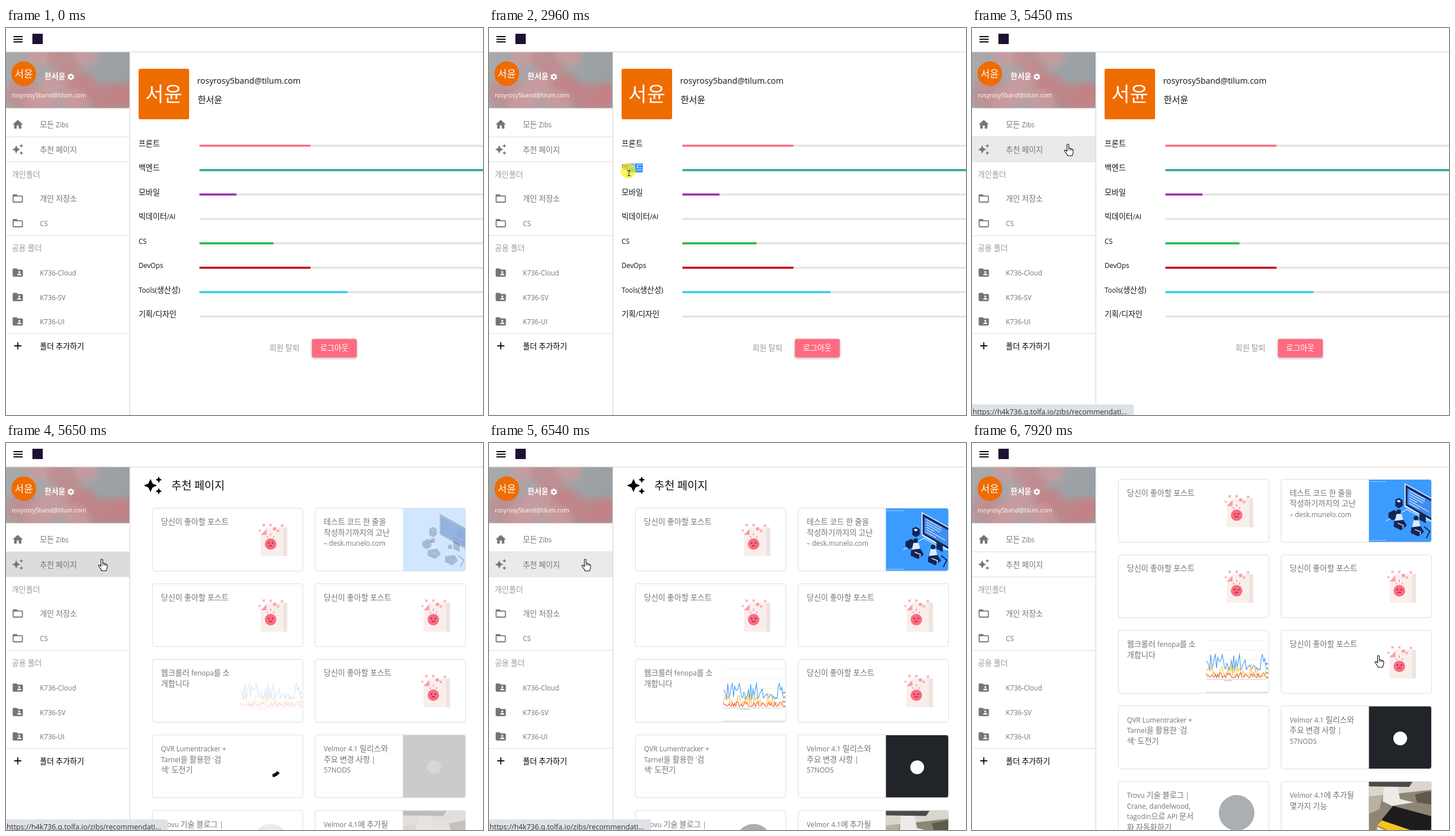
These frames come from a looping animation (831 px wide and 674 px high, 7990 ms). An HTML page with a canvas:

```html
<!DOCTYPE html>
<html lang="ko">
<head>
<meta charset="utf-8">
<title>Recommendation page</title>
<style>
html, body { margin: 0; width: 100%; height: 100%; overflow: hidden; background: #fff; }
canvas { display: block; width: 831px; height: 674px; }
</style>
</head>
<body>
<canvas id="stage" width="831" height="674"></canvas>
<script>
const c = document.getElementById('stage').getContext('2d');
const LOOP = 7990, GREY = '#757575', PINK = '#ff6b81', ORANGE = '#ef6c00';
const T = { select: 2500, release: 3300, click: 3440, hover: 4080, page: 5600, leave: 6560, scroll: 7540 };
const EMAIL = 'rosyrosy5band@tilum.com', NAME = '한서윤', SHORT = '서윤';

const clamp = v => Math.max(0, Math.min(1, v));
const ramp = (t, a, b) => clamp((t - a) / (b - a));
const easeOut = p => 1 - (1 - p) ** 3;
const smooth = p => p * p * (3 - 2 * p);
const noise = n => { const v = Math.sin(n * 127.1 + 11.7) * 43758.5453; return v - Math.floor(v); };

function rect(x, y, w, h, color, r = 0) {
  c.fillStyle = color;
  c.beginPath();
  c.roundRect(x, y, w, h, r);
  c.fill();
}
function disc(x, y, r, color) {
  c.fillStyle = color;
  c.beginPath();
  c.arc(x, y, r, 0, 7);
  c.fill();
}
function trace(points, close) {
  c.beginPath();
  for (let i = 0; i < points.length; i += 2) c.lineTo(points[i], points[i + 1]);
  if (close) c.closePath();
}
function poly(color, ...points) {
  c.fillStyle = color;
  trace(points, true);
  c.fill();
}
function line(color, width, ...points) {
  c.strokeStyle = color;
  c.lineWidth = width;
  trace(points);
  c.stroke();
}
function at(x, y, draw) {
  c.save();
  c.translate(x, y);
  draw();
  c.restore();
}

// Hangul and Latin runs use separate fonts; Latin is set a little smaller.
function text(str, x, y, size, color, weight = 400, centered = false) {
  const runs = str.match(/[가-힣]+|[^가-힣]+/g).map(s => {
    const font = /[가-힣]/.test(s)
      ? `${weight} ${size}px "Noto Sans CJK KR", "Noto Sans CJK", sans-serif`
      : `${weight} ${size * .88}px "Open Sans", sans-serif`;
    c.font = font;
    return { s, font, w: c.measureText(s).width };
  });
  if (centered) x -= runs.reduce((sum, r) => sum + r.w, 0) / 2;
  c.fillStyle = color;
  for (const r of runs) {
    c.font = r.font;
    c.fillText(r.s, x, y);
    x += r.w;
  }
}

const FOLDER = 'M20 6H12L10 4H4C2.9 4 2 4.9 2 6V18A2 2 0 0 0 4 20H20A2 2 0 0 0 22 18V8C22 6.9 21.1 6 20 6Z';
const star = (x, y, r) => {
  const k = r * .313;
  return `M${x} ${y - r}l${k} ${r - k}l${r - k} ${k}l${k - r} ${k}l${-k} ${r - k}l${-k} ${k - r}l${k - r} ${-k}l${r - k} ${-k}Z`;
};
const icons = {
  home: 'M10 20V14H14V20H19V12H22L12 3 2 12H5V20Z',
  spark: star(9, 12, 8) + star(19, 5, 4) + star(19, 19, 4),
  folder: FOLDER + 'M4 8H20V18H4Z',
  shared: FOLDER + 'M11 17V16C11 14.7 13.7 14 15 14S19 14.7 19 16V17ZM15 9A2 2 0 0 1 15 13A2 2 0 0 1 15 9Z',
  plus: 'M11 5H13V11H19V13H13V19H11V13H5V11H11Z'
};
for (const k in icons) icons[k] = new Path2D(icons[k]);
const HAND = new Path2D('M5 1.5C5-.2 8-.2 8 1.5V8C8.3 7 10.6 7 10.8 8.5 11.5 7.8 13.3 8.2 13.4 9.5 14.3 9 15.7 9.5 15.7 11V15C15.7 17.5 14 18 14 20.5H6C6 18.5 4 17 .8 12.5 0 11 1.8 9.8 3 11L5 13Z');
const ARROW = new Path2D('M.5.5V16.5L4.2 13 6.8 18.6 9 17.6 6.5 12.2H11.7Z');

function icon(name, x, y, size, color) {
  at(x - size / 2, y - size / 2, () => {
    c.scale(size / 24, size / 24);
    c.fillStyle = color;
    c.fill(icons[name], 'evenodd');
  });
}
function gear(x, y) {
  c.strokeStyle = '#fff';
  c.lineWidth = 2.6;
  c.beginPath();
  c.arc(x, y, 3.3, 0, 7);
  c.stroke();
  for (let i = 0; i < 6; i++) {
    const a = Math.PI / 6 + i * Math.PI / 3, dx = Math.cos(a), dy = Math.sin(a);
    line('#fff', 2.6, x + dx * 4, y + dy * 4, x + dx * 5.8, y + dy * 5.8);
  }
}

function banner() {
  c.save();
  c.beginPath();
  c.rect(0, 42, 216, 97.5);
  c.clip();
  const g = c.createLinearGradient(0, 42, 216, 110);
  g.addColorStop(0, '#aaa9aa');
  g.addColorStop(1, '#989fa4');
  rect(0, 42, 216, 98, g);
  const clouds = [[62, 44, 32], [100, 52, 34], [140, 48, 28], [112, 84, 32], [84, 104, 34],
    [30, 116, 38], [60, 130, 34], [138, 108, 34], [180, 128, 40], [206, 116, 26], [120, 132, 32]];
  clouds.forEach(([x, y, r], i) => {
    const tone = ['207,154,157', '196,137,140', '201,125,128'][x > 130 && y > 90 ? 2 : i % 2];
    const cloud = c.createRadialGradient(x - 4, y - 5, 0, x, y, r);
    cloud.addColorStop(0, `rgba(${tone},.85)`);
    cloud.addColorStop(.6, `rgba(${tone},.6)`);
    cloud.addColorStop(1, `rgba(${tone},0)`);
    disc(x, y, r, cloud);
  });
  c.restore();
}

const MENU = [
  [168, '모든 Zibs', 'home'], [211.5, '추천 페이지', 'spark'], [254.5, '개인폴더'],
  [297, '개인 저장소', 'folder'], [340, 'CS', 'folder'], [383, '공용 폴더'],
  [426, 'K736-Cloud', 'shared'], [468.5, 'K736-SV', 'shared'], [511, 'K736-UI', 'shared'],
  [553.5, '폴더 추가하기', 'plus']
];

function sidebar(t) {
  rect(0, 42, 216, 632, '#fff');
  banner();
  disc(31, 79.5, 21.5, ORANGE);
  text(SHORT, 31, 85.5, 17.4, '#fff', 400, true);
  text(NAME, 67, 88.5, 13.2, '#fff', 700);
  gear(113, 85);
  text(EMAIL, 10, 121, 11.8, '#fff');

  const hover = .15 * easeOut(ramp(t, T.hover, T.hover + 400)) * (1 - ramp(t, T.leave, T.leave + 260));
  rect(0, 190, 215, 43, `rgba(117,117,117,${hover})`);
  const press = .12 * (1 - ramp(t, 5850, 6320));
  const spread = easeOut(ramp(t, 5480, 5700));
  if (spread && press) {
    c.save();
    c.beginPath();
    c.rect(0, 190, 215, 43);
    c.clip();
    disc(167, 204, 190 * spread, `rgba(117,117,117,${press})`);
    c.restore();
  }
  for (const y of [189, 232.5, 361, 531.5]) rect(0, y, 215, 1, '#dedede');
  for (const [y, label, glyph] of MENU) {
    const color = glyph === 'plus' ? '#000' : glyph ? GREY : '#9a9a9a';
    if (glyph) icon(glyph, 20.5, y, 21.4, color);
    text(label, glyph ? 59 : 10, y + 5, 13.4, color);
  }
  rect(215, 42, 1.4, 632, '#d9d9d9');
}

function header() {
  rect(0, 0, 831, 42, '#fff');
  rect(0, 41, 831, 1.2, '#dadada');
  for (const y of [14, 18.6, 23.2]) rect(13, y, 16, 2, '#000');
  rect(46, 10, 18, 18, '#1e1233');
}

const SKILLS = [['프론트', .3, PINK], ['백엔드', 1, '#26a69a'], ['모바일', .1, '#9c27b0'], ['빅데이터/AI', 0],
  ['CS', .2, '#21ba45'], ['DevOps', .3, '#c10015'], ['Tools(생산성)', .4, '#31ccec'], ['기획/디자인', 0]];

function profile(t) {
  rect(231, 71, 88, 88, ORANGE, 3);
  text(SHORT, 275, 128, 35, '#fff', 400, true);
  text(EMAIL, 333, 96.5, 16.4, '#111');
  text(NAME, 334, 131, 15.5, '#111');
  SKILLS.forEach(([label, share, color], i) => {
    const y = 205 + i * 42.5;
    text(label, 231, y + .8, 13.4, '#111');
    rect(337, y - 1.8, 494, 3.6, '#e4e4e4');
    if (share) rect(337, y - 1.8, 645 * share, 3.6, color);
  });
  selection(t);
  text('회원 탈퇴', 459, 561.8, 13.4, '#9b9b9b');
  c.save();
  c.shadowColor = 'rgba(0,0,0,.35)';
  c.shadowBlur = 4;
  c.shadowOffsetY = 1.5;
  rect(533, 541.5, 78, 32, PINK, 3);
  c.restore();
  text('로그아웃', 572, 561.8, 13.4, '#fff', 400, true);
}

function selection(t) {
  const count = t >= T.click ? 0 : (t >= 2700) + (t >= 2900) + (t >= 3040);
  if (!count) return;
  const x = 231 + 12.33 * (3 - count);
  rect(x, 236, 268 - x, 15.5, '#3390ff');
  text('백엔드'.slice(3 - count), x, 248.3, 13.4, '#fff');
}

function sadFile() {
  poly('#f8efed', 46, 33, 82, 33, 82, 83, 36, 83, 36, 45);
  rect(75, 33, 7, 50, '#efe3e0');
  poly('#ff9aa8', 36, 46, 46, 36, 46, 46);
  disc(53, 62, 10, PINK);
  disc(49.5, 60, 1.3, '#7d2b3c');
  disc(56.5, 60, 1.3, '#7d2b3c');
  c.strokeStyle = '#7d2b3c';
  c.lineWidth = 1.2;
  c.beginPath();
  c.arc(53, 67.5, 3, 3.5, 5.9);
  c.stroke();
  for (const d of [-1, 0, 1]) line(PINK, 1.2, 53 + d * 6, 48 - (d ? 0 : 1), 53 + d * 4.5, 45 - (d ? 0 : 2) + Math.abs(d) * 6);
  disc(60, 35.5, 3, '#ff9aa8');
  disc(34, 38.5, 2, '#ffb0ba');
  for (const [x, y] of [[41, 29], [53, 29], [73, 30], [66, 39]]) {
    line('#ff8d9c', 1.2, x - 2, y - 2, x + 2, y + 2);
    line('#ff8d9c', 1.2, x - 2, y + 2, x + 2, y - 2);
  }
}
function isoDesk() {
  const navy = '#142556', pale = '#dcecff';
  rect(0, 0, 109, 109, '#3b9bff');
  for (let x = 2; x < 30; x += 3) {
    rect(x, 3, 1.4, 1.4, pale);
    rect(x, 105, 1.4, 1.4, pale);
  }
  poly(pale, 62, 6, 109, 32, 109, 74, 62, 47);
  poly(navy, 64, 9, 109, 34, 109, 71, 64, 45);
  poly('#3f8cf0', 67, 15, 109, 38, 109, 67, 67, 43);
  for (let i = 0; i < 6; i++) {
    const y = 19 + i * 4.4, len = 12 + 22 * noise(i);
    line(pale, 1.2, 70, y, 70 + len, y + len * .56);
  }
  poly(navy, 46, 35, 52, 32, 59, 36, 59, 46, 52, 50, 46, 46);
  poly(pale, 48, 37, 52, 35, 56, 38, 52, 40);
  line(pale, 1.2, 30, 72, 66, 52, 104, 73);
  poly(navy, 34, 58, 44, 53, 50, 57, 50, 66, 41, 71, 34, 66);
  for (const [x, y] of [[52, 68], [82, 79]]) {
    disc(x, y - 12, 4, navy);
    poly(pale, x - 7, y + 5, x - 4, y - 8, x + 5, y - 8, x + 8, y + 4);
    poly(navy, x - 8, y + 4, x + 8, y + 2, x + 14, y + 12, x + 4, y + 20, x - 9, y + 14);
    line(pale, 1.4, x - 2, y + 8, x + 8, y + 12, x + 7, y + 17);
  }
  poly(navy, 88, 56, 99, 62, 99, 76, 88, 70);
  line(navy, 2, 96, 82, 106, 90, 100, 102);
}
function chart() {
  for (let y = 16; y < 84; y += 17) rect(0, y, 108, 1, '#f0f0f0');
  [['#4a9ff0', 42, 14, 0], ['#f7c548', 23, 3, 90], ['#f0604d', 10, 1, 180]].forEach(([color, high, low, seed]) => {
    const pts = [];
    for (let i = 0; i <= 52; i++) pts.push(i * 2, 83 - low - (high - low) * noise(i + seed) ** 1.7);
    line(color, 1.2, ...pts);
  });
  rect(0, 84, 104, 1, '#c9c9c9');
  for (let y = 52; y < 84; y += 8) rect(104, y + 4, 4, 3, '#a9a9a9');
  rect(30, 86, 16, 1.5, '#c9c9c9');
  rect(0, 106.5, 108, 1.5, '#d8d8d8');
}
function darkTile() {
  rect(0, 0, 109, 109, '#212529');
  disc(54.5, 56, 12, '#fff');
}
function greyMark() { disc(53, 54, 31, '#a9afb2'); }
function deskPhoto() {
  rect(0, 0, 109, 109, '#8e8675');
  poly('#d9d6ce', 0, 0, 109, 0, 109, 14, 0, 26);
  poly('#4b4a48', 0, 0, 76, 0, 70, 9, 0, 8);
  poly('#ecebe8', 26, 9, 50, 9, 54, 30, 78, 36, 40, 42, 24, 34);
  poly('#b9b2a2', 0, 26, 24, 24, 18, 48, 0, 56);
  poly('#5f594e', 80, 22, 109, 16, 109, 40, 84, 36);
  poly('#e9e4d6', 14, 78, 76, 106, 109, 90, 109, 96, 78, 109, 14, 84);
  poly('#1c1c1c', 14, 76, 42, 42, 109, 60, 109, 82, 76, 104);
  poly('#f4c51c', 14, 76, 22, 67, 90, 90, 76, 104);
}
function spinner(t) {
  c.globalAlpha = 1 - ramp(t, 6200, 6340);
  c.strokeStyle = '#111';
  c.lineWidth = 5.5;
  const turn = Math.PI / 3 + (t - 5780) / 2000 * 2 * Math.PI;
  c.beginPath();
  c.arc(53, 54, 17, turn, turn + 1.05 + Math.max(-.9, (t - 5780) / 400));
  c.stroke();
  c.globalAlpha = 1;
}

const LIKED = '당신이 좋아할 포스트';
const CARDS = [
  [LIKED, sadFile], ['테스트 코드 한 줄을\n작성하기까지의 고난\n– desk.munelo.com', isoDesk, true],
  [LIKED, sadFile], [LIKED, sadFile],
  ['웹크롤러 fenopa를 소\n개합니다', chart, true], [LIKED, sadFile],
  ["QVR Lumentracker +\nTarnel을 활용한 '검\n색' 도전기", spinner], ['Velmor 4.1 릴리스와\n주요 변경 사항 |\n57NODS', darkTile, true],
  ['Trovu 기술 블로그 |\nCrane, dandelwood,\ntagodin으로 API 문서\n화 자동화하기', greyMark, true], ['Velmor 4.1에 추가될\n몇가지 기능', deskPhoto, true]
];

function feed(t) {
  const shift = 50.3 * smooth(ramp(t, T.scroll, 7925));
  c.save();
  c.beginPath();
  c.rect(217, 43, 614, 631);
  c.clip();
  c.translate(0, -shift);
  icon('spark', 256, 74, 34.5, '#000');
  text('추천 페이지', 288, 80.8, 19.3, '#111');
  CARDS.forEach(([title, art, remote], i) => {
    at(i % 2 ? 538.5 : 255, 113.5 + (i >> 1) * 131.6, () => {
      title.split('\n').forEach((s, n) => text(s, 15, 28.6 + n * 18.6, 13.5, '#747474'));
      c.save();
      c.beginPath();
      c.roundRect(0, 0, 262, 109.5, 4);
      c.clip();
      c.globalAlpha = remote ? ramp(t, T.page, T.page + 218) : 1;
      c.translate(153, .5);
      art(t);
      c.restore();
      c.strokeStyle = '#dcdcdc';
      c.lineWidth = 1;
      c.beginPath();
      c.roundRect(0, 0, 262, 109.5, 4);
      c.stroke();
    });
  });
  c.restore();
}

function statusBar(t) {
  const late = t > 6900;
  const alpha = late ? ramp(t, 6950, 7100) * (1 - ramp(t, 7270, 7440))
    : ramp(t, 4095, 4320) * (1 - ramp(t, 6620, 6800));
  if (!alpha) return;
  c.globalAlpha = alpha;
  rect(0, 655.5, 282, 19, '#dee1e6', [0, 4, 0, 0]);
  text(late ? 'hollem.com/.../velmor에서는-rowbundl이-...' : 'https://h4k736.q.tolfa.io/zibs/recommendati...',
    1, 673, 14.3, '#303438');
  c.globalAlpha = 1;
}

// time, x, y, shape used until the next key
const PATH = [
  [1190, 789, 164, 'arrow'], [1500, 590, 240, 'arrow'], [1750, 380, 328, 'arrow'], [1860, 302, 361, 'arrow'],
  [1930, 317, 306, 'arrow'], [2250, 290, 262, 'beam'], [2500, 280, 251, 'beam'], [2770, 253, 249, 'beam'],
  [2960, 242.5, 248.8, 'beam'], [3090, 230.5, 248.5, 'beam'], [3740, 230.5, 248.5, 'arrow'],
  [3960, 175, 218, 'hand'], [4050, 166, 203, 'hand'], [6540, 166, 203, 'hand'], [6620, 222, 222, 'arrow'],
  [6680, 275, 240, 'hand'], [7000, 560, 326, 'hand'], [7300, 698, 354, 'hand'], [7370, 698, 354, 'hand'],
  [7920, 707, 371, 'hand'], [LOOP, 707, 371, 'hand']
];

function cursor(t) {
  const i = PATH.findIndex((k, n) => n && t >= PATH[n - 1][0] && t < k[0]);
  if (i < 0) return;
  const [a, b] = [PATH[i - 1], PATH[i]], p = ramp(t, a[0], b[0]);
  const x = a[1] + (b[1] - a[1]) * p, y = a[2] + (b[2] - a[2]) * p;
  if ((t >= T.select && t < T.release) || (t >= T.click && t < 3510)) disc(x, y, 13.3, 'rgba(250,240,0,.62)');
  if (a[3] === 'beam') {
    at(x + 1.5, y + 4, () => {
      line('#222', 1, -3, -4.5, 3, -4.5);
      line('#222', 1, 0, -4.5, 0, 4.5);
      line('#222', 1, -3, 4.5, 3, 4.5);
    });
    return;
  }
  const hand = a[3] === 'hand', shape = hand ? HAND : ARROW;
  at(hand ? x - 5.5 : x, hand ? y - 1 : y, () => {
    c.fillStyle = '#fff';
    c.strokeStyle = '#111';
    c.lineWidth = 1.1;
    c.lineJoin = 'round';
    c.fill(shape);
    c.stroke(shape);
    if (hand) for (const k of [8, 10.8, 13.4]) line('#111', .9, k, 8.5, k, 11.5);
  });
}

function frame(now) {
  const t = now % LOOP;
  rect(0, 0, 831, 674, '#fff');
  if (t < T.page) profile(t); else feed(t);
  sidebar(t);
  header();
  statusBar(t);
  cursor(t);
  requestAnimationFrame(frame);
}
const start = performance.now();
frame(0);
function frameTime() { return performance.now() - start; }
</script>
</body>
</html>
```
